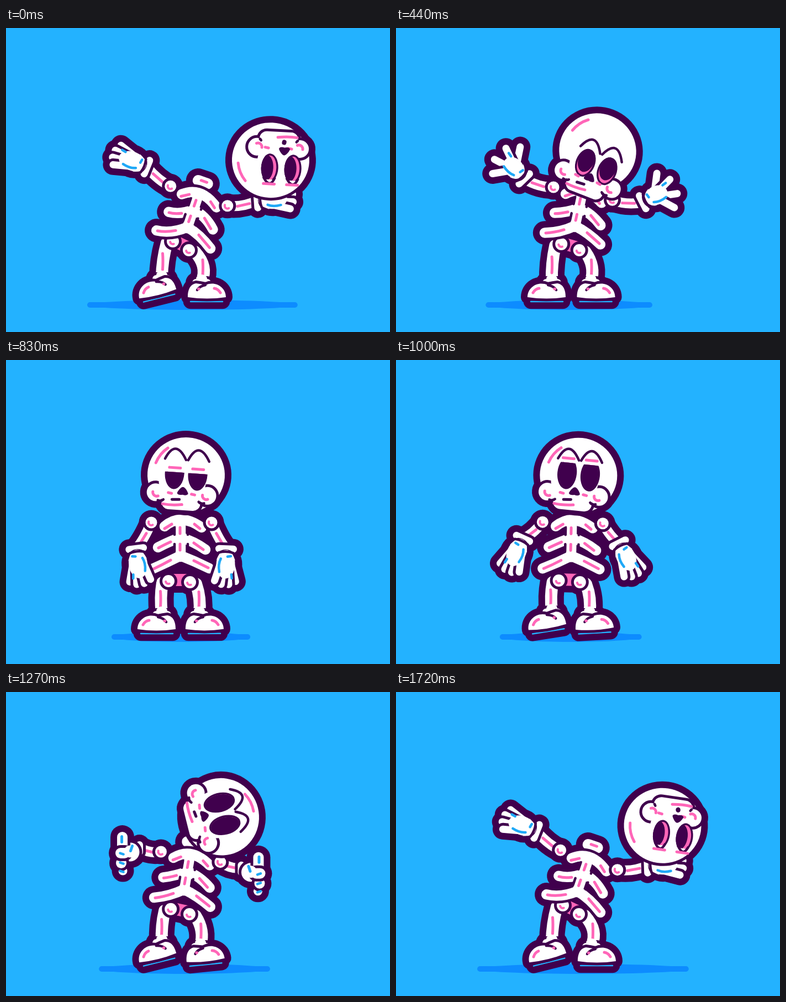
Write an HTML page with a canvas that moves like this. It is 695 px wide and 550 px high and loops after 1.77 s.

```html
<!DOCTYPE html>
<html lang="en">
<head>
<meta charset="utf-8">
<title>Skeleton juggling its head</title>
<style>
  html, body { margin: 0; width: 100%; height: 100%; overflow: hidden; background: #23b2ff; }
  canvas { display: block; }
</style>
</head>
<body>
<canvas id="stage" width="695" height="550"></canvas>
<script>
const ctx = document.getElementById('stage').getContext('2d');
const SKY = '#23b2ff', SHADE = '#0d8cff', DARK = '#40004d', WHITE = '#fff', PINK = '#ff66b8', BLUE = '#1fa9f7';
const LOOP = 1770, STEP = 1000 / 18, STEPS = 32;

// Key poses: hold, toss, catch, rest, thumbs up, roll. Angles in degrees.
const KEYS = [0, 4, 8, 15, 21, 26];
const LEAN = [1, .85, .65, 0, .3, .85];
const ARMS = { left: [219, 217, 196, 120, 175, 209], right: [-10, -32, 4, 61, 29, -2] };
const HANDS = { left: [202, 233, 226, 83, 170, 212], right: [-4, -60, -27, 92, 15, -15] };

const mix = (a, b, u) => a + (b - a) * u;
const bump = (step, center, width) => Math.exp(-(((step - center) / width) ** 2));
function smooth(from, to, step) {
  const u = Math.min(1, Math.max(0, (step - from) / (to - from)));
  return u * u * (3 - 2 * u);
}
function polar(x, y, degrees, length) {
  const angle = degrees * Math.PI / 180;
  return { x: x + Math.cos(angle) * length, y: y + Math.sin(angle) * length };
}

// Cyclic cubic interpolation through the key poses.
function sample(values, step) {
  const count = KEYS.length;
  const key = i => KEYS[(i + count) % count] + STEPS * Math.floor(i / count);
  const value = i => values[(i + count) % count];
  const slope = i => (value(i + 1) - value(i - 1)) / (key(i + 1) - key(i - 1));
  let i = count - 1;
  while (KEYS[i] > step) i--;
  const span = key(i + 1) - key(i);
  let u = (step - key(i)) / span;
  if (KEYS[i] === 8) u = 1 - (1 - u) ** 1.5;
  const v = 1 - u;
  return value(i) * v * v * (1 + 2 * u) + value(i + 1) * u * u * (3 - 2 * u)
    + span * u * v * (slope(i) * v - slope(i + 1) * u);
}

// The whole figure follows from the lean, the arm angles and who carries the head.
function poseAt(step) {
  const lean = sample(LEAN, step);
  const air = step < 8 ? Math.sin(Math.PI * step / 8) : 0;
  const nod = bump(step, 8, 2), rest = bump(step, 15, 3), fist = bump(step, 21, 3);
  const heel = 1 - smooth(4, 8, step) + smooth(15, 20, step);
  const settle = .07 * Math.max(0, Math.sin(Math.PI * (step - 26) / 6)) * (step > 26);
  const carry = step < 8 ? 1 - step / 8 : smooth(21, 26, step) + settle;

  const torso = { x: 316 + 11 * lean + 3 * air, y: 358 + 6 * lean - 11 * air, turn: 19 * lean };
  const onTorso = (x, y, pop) => {
    const across = polar(torso.x, torso.y, torso.turn, x);
    const p = polar(across.x, across.y, torso.turn + 90, y);
    return { x: p.x + air * pop * .85, y: p.y - air * pop };
  };
  const arm = (side, name, shoulderX) => {
    const shoulder = onTorso(shoulderX, -64, 14);
    const wrist = polar(shoulder.x, shoulder.y, sample(ARMS[name], step), 55 - 24 * fist);
    return { side, ...shoulder, wrist, aim: sample(HANDS[name], step), spread: .3 + .7 * nod, fist: fist > .5 };
  };
  const leftArm = arm(-1, 'left', -53), rightArm = arm(1, 'right', 56);

  const seat = onTorso(10, -150, 0);
  const head = {
    x: mix(seat.x, rightArm.wrist.x + 24, carry),
    y: mix(seat.y + 5 * nod, rightArm.wrist.y - 73, carry) - 80 * air,
    turn: mix(torso.turn * 1.4 + 4, 183, carry),
    carry, nod, rest, tuck: carry ** 3
  };
  return {
    torso, leftArm, rightArm, head,
    neck: { ...onTorso(0, -90, 28), turn: mix(torso.turn, -40, air), half: 9 - 6 * air, width: 20 + 11 * air },
    leftLeg: {
      side: -1, x: 294 + 8 * lean, y: 400 - 14 * lean - 9 * air, knee: -2,
      ankle: { x: 282, y: 458 - 7 * heel }, foot: { x: 272 + 3 * heel, y: 490 - 6 * heel }, tilt: -14 * heel
    },
    rightLeg: {
      side: 1, x: 333 - 2 * lean, y: 402 - 6 * air, knee: 3 + 6 * lean,
      ankle: { x: 350 + 4 * lean, y: 458 }, foot: { x: 360 + 4 * lean, y: 490 - 3 * fist }, tilt: -9 * fist
    },
    shadow: { from: 191 - 44 * lean + 15 * air, to: 441 + .56 * (head.x - 324) - 40 * air }
  };
}

function line(...p) {
  return new Path2D(`M${p[0]} ${p[1]}${p.length > 4 ? 'Q' : 'L'}${p.slice(2).join(' ')}`);
}
function oval(x, y, rx, ry = rx) {
  const path = new Path2D();
  path.ellipse(x, y, rx, ry, 0, 0, Math.PI * 2);
  return path;
}
function arc(x, y, r, from, to) {
  const path = new Path2D();
  path.arc(x, y, r, from * Math.PI / 180, to * Math.PI / 180);
  return path;
}

let outlining = false;

function stroke(path, color, width) {
  ctx.strokeStyle = color;
  ctx.lineWidth = width;
  ctx.stroke(path);
}
function fill(path, color) {
  if (outlining) return;
  ctx.fillStyle = color;
  ctx.fill(path);
}
function mark(path, color = PINK, width = 5) {
  if (!outlining) stroke(path, color, width);
}
// Inked group: solid shapes, or strokes when a width is given.
function ink(paths, width = 0, color = WHITE) {
  for (const path of paths) stroke(path, DARK, width + (outlining ? 24 : 10));
  if (outlining) return;
  for (const path of paths) width ? stroke(path, color, width) : fill(path, color);
}
function place(p, degrees, flipX, flipY, draw) {
  ctx.save();
  ctx.translate(p.x, p.y);
  ctx.rotate(degrees * Math.PI / 180);
  ctx.scale(flipX, flipY);
  draw();
  ctx.restore();
}

function drawLeg({ side, x, y, knee, ankle, foot, tilt }) {
  const topX = x + 11 * side, topY = y + 3;
  const midX = (topX + ankle.x) / 2 + knee, midY = (topY + ankle.y) / 2;
  ink([line(topX, topY, midX + knee, midY, ankle.x, ankle.y)], 22);
  mark(line(midX - 1, midY - 12, midX, midY, midX - 1, midY + 17));
  ink([oval(x, y, 11)]);
  mark(arc(x, y, 5, 70, 170), PINK, 4);
  ink([line(ankle.x - 10, ankle.y + 3, ankle.x + 10, ankle.y + 3)], 14);
  fill(oval(ankle.x, ankle.y - 4, 10, 8), WHITE);
  place(foot, tilt, -side, 1, () => {
    ink([line(-28, 5, 30, 5)], 2.5, SKY);
    ink([new Path2D('M-34-3C-34-21-15-33 3-25Q12-27 20-28C33-26 35-12 35-3Q0 2-34-3Z')]);
    mark(line(-24, -11, -20, -18, -13, -19));
    mark(line(3, -25, 14, -23, 18, -16), DARK, 4.5);
    mark(line(15, -18, 15.5, -18));
  });
}

function drawTorso(p) {
  place(p, p.turn, 1, 1, () => {
    const sag = p.turn * .5, lift = p.turn * .25;
    ink([
      line(0, -66, 0, -2),
      line(-29, -57, 0, -82, 38, -55),
      line(0, -37, -20, -30 + sag, -41, -19),
      line(0, -37, 24, -30 - lift, 45, -15),
      line(0, -4, -24, 8 + sag, -51, 20),
      line(0, -4, 26, 6 - lift, 52, 19)
    ], 18.5);
    for (const y of [-55, -25]) {
      mark(line(-1, y, -1, y + 11));
      mark(line(-11, y, -11, y + 13), DARK, 4.5);
      mark(line(13, y, 13, y + 13), DARK, 4.5);
    }
    mark(line(-29, -53, -16, -61));
    mark(line(25, -61, 35, -53));
    mark(line(-40, -18, -31, -23 + sag / 2, -18, -29 + sag / 2));
    mark(line(24, -27 - lift / 2, 41, -15));
    mark(line(-49, 20, -34, 13 + sag / 2, -18, 4 + sag / 2));
    mark(line(24, 5 - lift / 2, 50, 18));
  });
}

function drawHand(spread) {
  ink([line(0, -13, 0, 13)], 13);
  ink([oval(28, 0, 22, 18)]);
  for (let i = 0; i < 4; i++) {
    const k = i - 1.5;
    const tip = polar(30, k * 7, k * spread * 37, 37 - Math.abs(k) * 5);
    ink([line(30, k * 7, tip.x, tip.y)], 13);
  }
  fill(oval(28, 0, 28 - 7 * spread, 17), WHITE);
  mark(line(7, -13, 3, 0, 7, 13), DARK, 4.5);
  mark(line(18, 9, 28, 14, 42, 11), BLUE, 4.5);
  mark(line(13, -9, 14, -3), BLUE, 4.5);
  mark(line(46, -11, 53, -12), BLUE, 4.5);
}

function drawThumbsUp() {
  ink([line(0, -5, 0, 8)], 13);
  ink([oval(17, 8, 17)]);
  ink([line(31, -19, 31, 0)], 19);
  ink([oval(30, 42, 8)]);
  ink([oval(33, 28, 9.5)]);
  ink([line(27, 10, 34, 10)], 19);
  fill(oval(17, 7, 11), WHITE);
  mark(line(32, -20, 32, -10), BLUE);
  mark(line(13, -3, 16, 6), BLUE);
  for (const y of [11, 28, 43]) mark(line(29, y + 1, 35, y - 1), BLUE, 4.5);
}

function drawArm({ side, x, y, wrist, aim, spread, fist }) {
  const midX = (x + wrist.x) / 2, midY = (y + wrist.y) / 2;
  const dx = (wrist.x - x) * .17, dy = (wrist.y - y) * .17;
  ink([line(x, y, midX, midY + 8, wrist.x, wrist.y)], 18);
  mark(line(midX - dx, midY + 4 - dy, midX + dx * 1.4, midY + 3 + dy * 1.4));
  ink([oval(x, y, 10.5)]);
  mark(arc(x, y, 5, 60, 200), PINK, 4);
  if (fist) place(wrist, 0, side, 1, drawThumbsUp);
  else place(wrist, aim, 1, side, () => drawHand(spread));
}

function drawNeck(p) {
  place(p, p.turn, 1, 1, () => {
    ink([line(-p.half, 0, p.half, 0)], p.width);
    mark(line(-4, -2, 7, -2));
  });
}

function drawEye(x, y, { tuck, nod, rest }) {
  if (outlining) return;
  const width = 17.5 - 2 * tuck, height = 29 - 3 * tuck - 3 * nod;
  const lid = .47 * rest + .1 * tuck, top = y - height * (1 - 2 * lid);
  ctx.save();
  ctx.beginPath();
  ctx.rect(x - 40, top, 80, 100);
  ctx.clip();
  const socket = oval(x, y, width, height);
  fill(socket, DARK);
  ctx.clip(socket);
  fill(oval(x, y, width - 3.5, height - 3.5), PINK);
  fill(oval(x + 6 * tuck, y - 6 * nod, width - 3, height - 3), DARK);
  ctx.restore();
  const half = 19 - 9 * tuck, peak = y - 44 + 16 * tuck;
  mark(line(x - half, peak + half, x - 2, peak - half, x + half, peak + half), DARK, 4.5);
  if (lid > .08) mark(line(x - 10, top - 8, x + 10, top - 8));
}

function drawHead(p) {
  const { carry, nod, tuck } = p;
  place(p, p.turn, 1, 1, () => {
    const shine = 215 + 120 * carry, cheek = 47 - 8 * tuck;
    ink([oval(0, 0, 70, 68)]);
    mark(arc(0, 0, 59, shine - 17, shine + 17));
    ctx.translate(-6 - 7 * tuck + 8 * nod, 35 - 12 * tuck + 20 * nod);
    const jaw = new Path2D();
    jaw.roundRect(-35, -10, 70, 39, 13);
    ink([oval(-cheek, 0, 16), oval(cheek, 0, 16), jaw]);
    fill(oval(0, -24, 43 - 6 * tuck, 37), WHITE);
    const eyesX = 6 - 13 * carry, eyesY = -37 + 10 * nod;
    for (const side of [-1, 1]) {
      drawEye(eyesX + side * 21, eyesY, p);
      mark(line(side * 21 - 3, -1, side * 21 + 3, 0));
      mark(arc(side * (cheek - 2), 0, 7, 65, 185));
      mark(line(side * (cheek - 5), 14, side * 35, 16, side * 32, 12), DARK, 4.5);
    }
    place({ x: eyesX - 4, y: -3 }, 0, 1, 1, () =>
      fill(new Path2D('M0-10C4-10 10-1 10 2Q8 6 0 4Q-8 6-10 2C-10-1-4-10 0-10Z'), DARK));
    const smile = 6.5 * (1 - carry);
    mark(line(-10 - smile, 11, -9.8 + smile, 10), DARK, 5 + 3 * tuck);
    mark(line(-33, 20, -18, 22, 2, 19));
  });
}

function drawScene(step) {
  const { head, neck, torso, leftArm, rightArm, leftLeg, rightLeg, shadow } = poseAt(step);

  ctx.fillStyle = SKY;
  ctx.fillRect(0, 0, 695, 550);
  mark(line(shadow.from + 5, 501, shadow.to - 5, 501), SHADE, 10);
  fill(oval((shadow.from + shadow.to) / 2, 501, (shadow.to - shadow.from) / 2, 9), SHADE);

  // The heavy silhouette of the whole figure goes below the inked parts.
  for (outlining of [true, false]) {
    ink([line(leftLeg.x, leftLeg.y - 2, rightLeg.x, rightLeg.y - 4)], 22, PINK);
    drawLeg(leftLeg);
    drawLeg(rightLeg);
    drawNeck(neck);
    drawTorso(torso);
    drawArm(leftArm);
    drawArm(rightArm);
    drawHead(head);
  }
}

ctx.lineCap = ctx.lineJoin = 'round';

function tick() {
  const time = performance.now() % LOOP;
  drawScene(Math.min(STEPS - 1, Math.floor((time + 8) / STEP)));
  requestAnimationFrame(tick);
}
tick();
</script>
</body>
</html>
```
